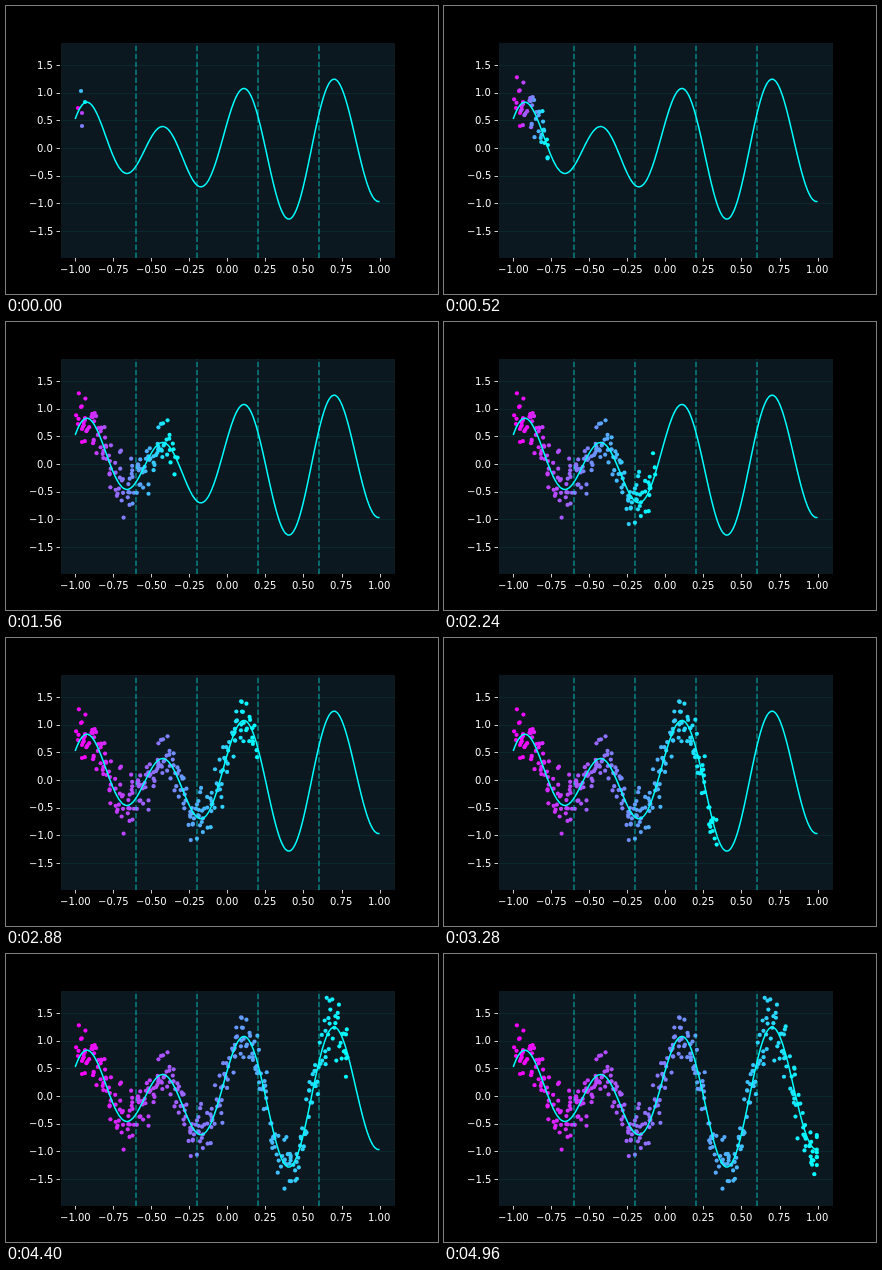
Write an HTML page with a canvas that moves like this. It is 432 px wide and 288 px high and loops after 5000 ms.

```html
<!DOCTYPE html>
<html lang="en">
<head>
<meta charset="utf-8">
<title>Noisy samples along a curve</title>
<style>
  html, body { margin: 0; width: 100%; height: 100%; overflow: hidden; background: #000; }
  canvas { display: block; }
</style>
</head>
<body>
<canvas id="stage" width="432" height="288"></canvas>
<script>
const ctx = document.getElementById('stage').getContext('2d');
const LOOP = 5000, STEP = 40;
const OPENING = 5, DOTS_PER_STEP = 3.2, TOTAL = 402;
const BOX = { left: 55, top: 37, right: 389, bottom: 252 };

const toX = v => 221.4 + 152.18 * v;
const toY = v => 142 - 55.33 * v;
const wave = x => 0.83 * Math.sin(11.45 * x) + 0.47 * Math.cos(8.341 * x);

function seeded(seed) {
  return () => {
    seed = (seed * 1664525 + 1013904223) >>> 0;
    return seed / 4294967296;
  };
}

// Samples arrive from left to right, slightly out of order.
function makeDots() {
  const random = seeded(2024);
  const dots = [[72, 102], [76, 107], [76, 120], [75, 85], [79, 96]].map(([x, y]) => ({ x, y }));
  while (dots.length < TOTAL) {
    const progress = (dots.length - OPENING) / (TOTAL - OPENING);
    const x = Math.min(0.995, -0.995 + 2 * progress + random() * 0.045);
    const noise = (random() + random() + random() - 1.5) * 0.5;
    dots.push({ x: toX(x), y: toY(wave(x) + noise) });
  }
  return dots;
}

const dots = makeDots();

function line(x1, y1, x2, y2) {
  ctx.beginPath();
  ctx.moveTo(x1, y1);
  ctx.lineTo(x2, y2);
  ctx.stroke();
}

const label = (v, digits) => (v < 0 ? '\u2212' : '') + Math.abs(v).toFixed(digits);

// Places text on whole pixels; align is 0.5 for centred and 1 for right-aligned.
function drawLabel(text, x, y, align) {
  const width = ctx.measureText(text).width;
  ctx.fillText(text, Math.round(x - width * align), Math.round(y));
}

function drawAxes() {
  ctx.fillStyle = '#000';
  ctx.fillRect(0, 0, 432, 288);
  ctx.fillStyle = '#0c1820';
  ctx.fillRect(BOX.left, BOX.top, BOX.right - BOX.left, BOX.bottom - BOX.top);
  ctx.font = '10px "DejaVu Sans", sans-serif';
  ctx.fillStyle = '#fff';
  ctx.lineWidth = 0.8;

  for (let v = -1.5; v <= 1.5; v += 0.5) {
    const y = Math.round(toY(v)) + 0.5;
    ctx.strokeStyle = 'rgba(0, 240, 225, 0.08)';
    line(BOX.left, y, BOX.right, y);
    ctx.strokeStyle = '#fff';
    line(50.5, y, 54, y);
    drawLabel(label(v, 1), 47, toY(v) + 3.8, 1);
  }

  for (let v = -1; v <= 1; v += 0.25) {
    const x = Math.round(toX(v)) + 0.5;
    line(x, BOX.bottom, x, BOX.bottom + 3.5);
    drawLabel(label(v, 2), toX(v), 267, 0.5);
  }
}

function drawDots(count) {
  for (let i = 0; i < count; i++) {
    const t = i / (count - 1);
    ctx.fillStyle = `rgb(${Math.round(255 * (1 - t))}, ${Math.round(255 * t)}, 255)`;
    ctx.beginPath();
    ctx.arc(dots[i].x, dots[i].y, 2.1, 0, Math.PI * 2);
    ctx.fill();
  }
}

function drawLines() {
  ctx.lineWidth = 1.5;
  ctx.strokeStyle = 'rgba(0, 240, 225, 0.5)';
  ctx.setLineDash([5.55, 2.4]);
  for (let v = -0.6; v < 0.7; v += 0.4) {
    const x = Math.round(toX(v));
    line(x, BOX.bottom, x, BOX.top);
  }
  ctx.setLineDash([]);

  ctx.strokeStyle = '#0ff';
  ctx.lineJoin = 'round';
  ctx.beginPath();
  for (let i = 0; i <= 300; i++) {
    const x = -1 + i / 150;
    ctx.lineTo(toX(x), toY(wave(x)));
  }
  ctx.stroke();
}

function render() {
  const tick = Math.floor((performance.now() % LOOP) / STEP);
  drawAxes();
  drawDots(Math.min(TOTAL, OPENING + Math.round(DOTS_PER_STEP * tick)));
  drawLines();
  requestAnimationFrame(render);
}

render();
</script>
</body>
</html>
```
